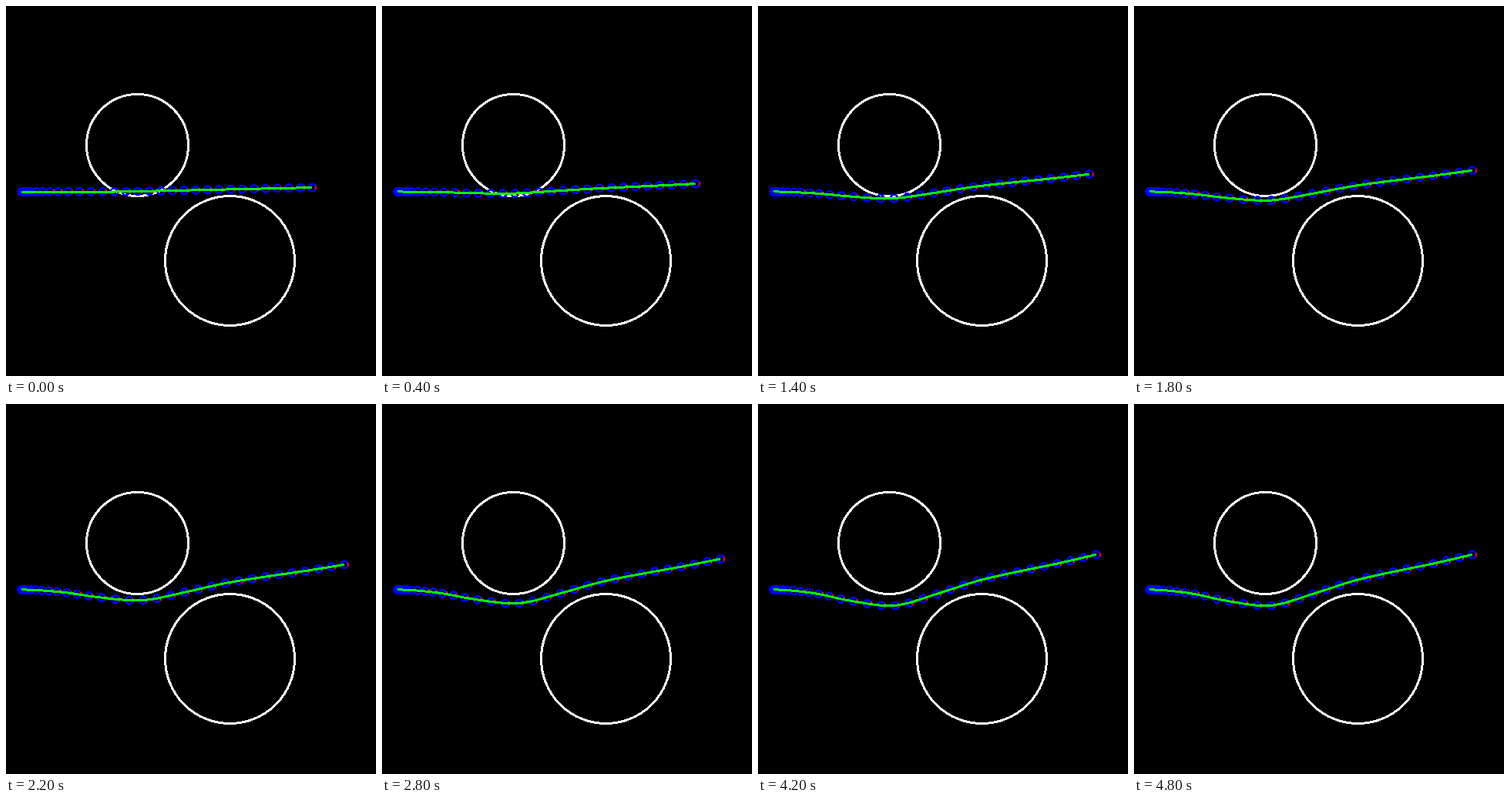
An HTML page that plays this animation: 480 by 480 pixels, repeating every 5200 ms.

```html
<!DOCTYPE html>
<html lang="en">
<head>
<meta charset="utf-8">
<title>Path between two circles</title>
<style>
html, body { margin: 0; width: 100%; height: 100%; overflow: hidden; background: #000; }
svg { display: block; width: 100vw; height: 100vh; }
</style>
</head>
<body>
<svg viewBox="0 0 480 480" fill="none" shape-rendering="crispEdges">
  <rect width="480" height="480" fill="#000"/>
  <g stroke="#fff" stroke-width="3">
    <circle cx="170.5" cy="180.5" r="66"/>
    <circle cx="290.5" cy="330.5" r="84"/>
  </g>
  <g id="rings" stroke="#00f" stroke-width="2.7"></g>
  <path id="ticks" stroke="#f00" stroke-width="2"/>
  <path id="route" stroke="#0f0" stroke-width="3" stroke-linejoin="round"/>
</svg>
<script>
const LOOP = 5200, STEP = 200, LAST_STEP = 24, COUNT = 32;
const STRETCH_TIME = 1800, BEND_TIME = 3250;

// Vertical shift of the settled route at every third point
const bend = [0, 0, 1.3, 5.5, 15, 21, 7, -9, -20, -29.5, -40.2];

const byId = id => document.getElementById(id);
const mix = (a, b, u) => a + (b - a) * u;

const rings = Array.from({ length: COUNT }, () => {
  const ring = document.createElementNS("http://www.w3.org/2000/svg", "circle");
  ring.setAttribute("r", 4.7);
  return byId("rings").appendChild(ring);
});

// Distance after n ticks: speed up to the cruise speed, then slow by drag
function travel(n, accel, cruise, drag) {
  const full = cruise / (2 * accel);
  if (n < full) return accel * n * n;
  const rest = n - full;
  return accel * full * full + cruise * rest - drag * rest * rest;
}

// Catmull-Rom curve through evenly spaced knots
function spline(knots, s) {
  const end = knots.length - 1;
  const i = Math.min(Math.floor(s), end - 1), u = s - i;
  const knot = n => n > end ? 2 * knots[end] - knots[end - 1] : knots[Math.max(n, 0)];
  const a = knot(i - 1), b = knot(i), c = knot(i + 1), d = knot(i + 2);
  return b + u / 2 * (c - a + u * (2 * a - 5 * b + 4 * c - d + u * (3 * (b - c) + d - a)));
}

function pointAt(i, stretch, bent) {
  const n = Math.max(0, i - 1);
  const x = 20.3 + mix(travel(n, 0.75, 15.1, 0), travel(n, 0.72, 18.2, 0.041), stretch);
  const y = 241 - 0.33 * Math.max(0, n - 13.5) + bent * spline(bend, n / 3);
  return [x, y];
}

function draw(t) {
  const time = Math.min(Math.floor(t / STEP), LAST_STEP) * STEP;
  const stretch = Math.min(1, time / STRETCH_TIME);
  const bent = Math.min(1, time / BEND_TIME);
  const points = rings.map((ring, i) => {
    const [x, y] = pointAt(i, stretch, bent);
    ring.setAttribute("cx", x);
    ring.setAttribute("cy", y);
    return [x, y];
  });
  byId("route").setAttribute("d", "M" + points.map(p => p.join(" ")).join("L"));
  byId("ticks").setAttribute("d",
    points.slice(8).map(([x, y]) => `M${x + 5} ${y - 2.6}v5.2`).join(""));
}

const start = performance.now();
function tick() {
  draw((performance.now() - start) % LOOP);
  requestAnimationFrame(tick);
}
tick();
</script>
</body>
</html>
```
